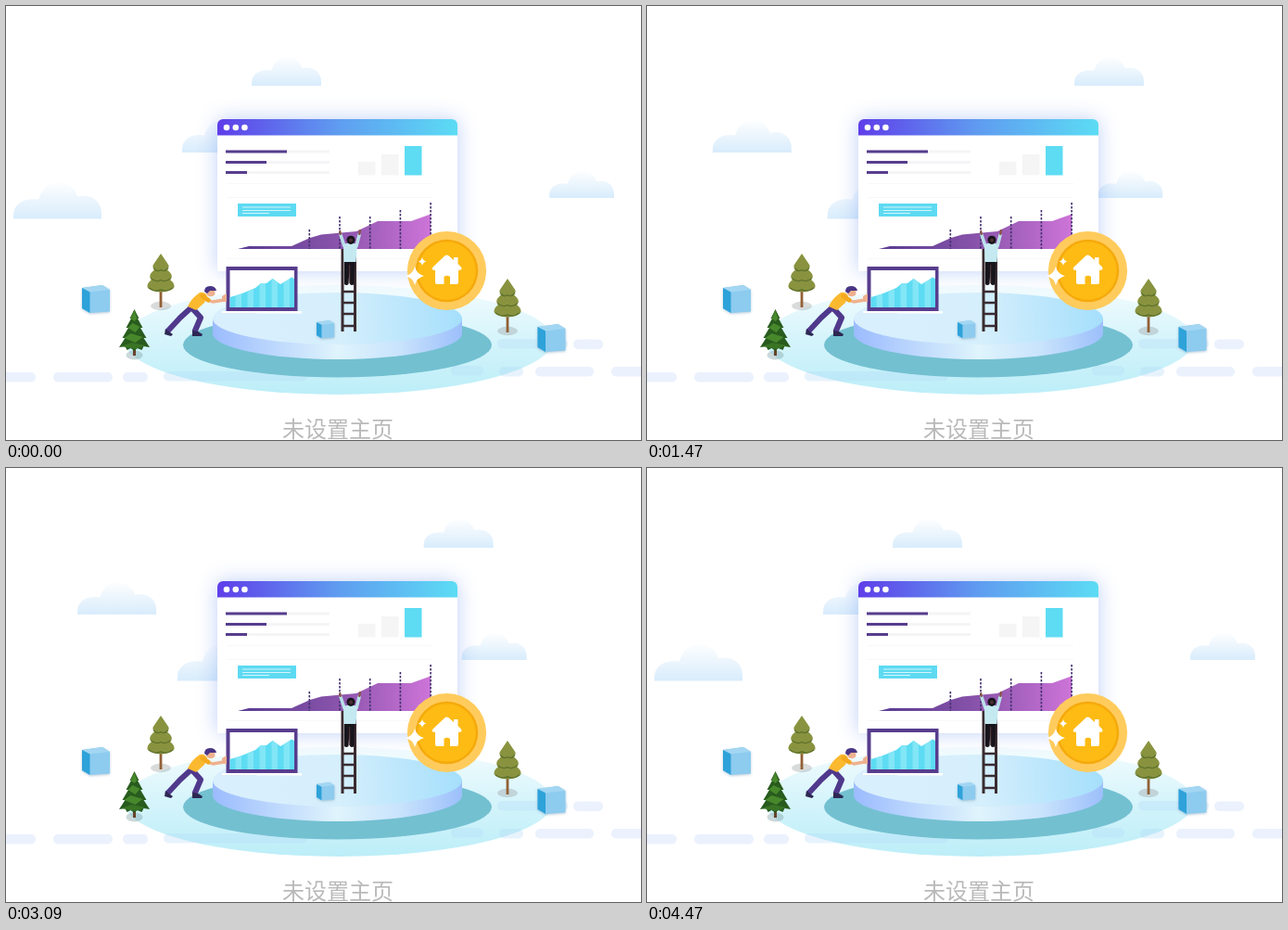
Animation of 685 by 468 pixels, one loop 4.5 s. Source, as an HTML page with a canvas:

```html
<!DOCTYPE html>
<html lang="zh">
<head>
<meta charset="utf-8">
<style>
html, body { margin: 0; width: 100%; height: 100%; overflow: hidden; background: #fff; }
canvas { display: block; width: 685px; height: 468px; }
</style>
</head>
<body>
<canvas id="stage" width="685" height="468"></canvas>
<script>
const W = 685, H = 468;
const LOOP = 4500, STEP = 30, TURN = 2245, LAST = 4470;
const stage = document.getElementById('stage').getContext('2d');
const sceneCanvas = document.createElement('canvas');
sceneCanvas.width = W;
sceneCanvas.height = H;
const g = sceneCanvas.getContext('2d');

const fill = (color, d) => { g.fillStyle = color; g.fill(new Path2D(d)); };
const rect = (color, x, y, w, h) => { g.fillStyle = color; g.fillRect(x, y, w, h); };
function line(color, width, d, cap = 'butt') {
  g.strokeStyle = color;
  g.lineWidth = width;
  g.lineCap = cap;
  g.lineJoin = 'round';
  g.stroke(new Path2D(d));
}
function oval(color, x, y, rx, ry = rx) {
  g.fillStyle = color;
  g.beginPath();
  g.ellipse(x, y, rx, ry, 0, 0, Math.PI * 2);
  g.fill();
}
function rounded(color, x, y, w, h, r) {
  g.fillStyle = color;
  g.beginPath();
  g.roundRect(x, y, w, h, r);
  g.fill();
}
function gradient(ctx, x0, y0, x1, y1, ...colors) {
  const result = ctx.createLinearGradient(x0, y0, x1, y1);
  colors.forEach((c, i) => result.addColorStop(i / (colors.length - 1), c));
  return result;
}
function at(x, y, scale, draw) {
  g.save();
  g.translate(x, y);
  g.scale(scale, scale);
  draw();
  g.restore();
}

function drawGround() {
  oval(gradient(g, 0, 301, 0, 419, '#f4fcfe', '#d5f4fb', '#bceef8'), 358.5, 360, 231.5, 59);
  const pill = (x, y, w, color = '#ebf1fd') => rounded(color, x, y, w, 10.5, 5);
  pill(-8, 395, 40);
  pill(51, 395, 64);
  pill(126, 395, 27);
  pill(571, 389, 63);
  pill(653, 389, 40);
  pill(612, 359.5, 32);
  const tint = 'rgba(175,215,245,.3)';
  pill(170, 394, 155, tint);
  pill(480, 388, 35, tint);
  pill(532, 389, 26, tint);
  pill(530, 359, 76, tint);
  oval('#73c0d1', 357.5, 365.5, 166.5, 35);
  fill(gradient(g, 223, 0, 492, 0, '#9bbbfe', '#bdd8fd', '#dff4fc', '#c9e3fc', '#9cbffb'),
    'M223 337V353A134.5 28 0 0 0 492 353V337Z');
  oval(gradient(g, 223, 345, 492, 325, '#d9effd', '#d6effc', '#a5dffc'), 357.5, 337, 134.5, 28);
}

function drawWindow() {
  g.save();
  g.shadowColor = 'rgba(85,130,235,.38)';
  g.shadowBlur = 22;
  rounded('#fff', 228, 122, 259, 164, [6, 6, 0, 0]);
  g.restore();
  rounded(gradient(g, 228, 0, 487, 0, '#5f3ee9', '#5f9cf0', '#5cdcf4'), 228, 122, 259, 17.5, [6, 6, 0, 0]);
  [238, 247.8, 257.4].forEach(x => oval('#fff', x, 131, 3.3));

  [[155.5, 66], [167, 44], [178, 23]].forEach(([y, w]) => {
    rect('#f5f5f7', 237, y, 112, 3);
    rect('#573d8d', 237, y, w, 3);
  });
  rect('#f5f5f6', 380, 168, 18.5, 14.5);
  rect('#f5f5f6', 405, 160, 18.5, 22.5);
  rect('#5ddcf3', 430, 151, 18.5, 31.5);
  [191, 206, 272].forEach(y => rect('#f8f8f9', 238, y, 222, 1));

  rect('#5ddaf2', 250, 213, 63, 14);
  [[216.5, 52], [220, 52], [223, 29]].forEach(([y, w]) => rect('#d5f5fb', 255, y, w, 1));

  fill(gradient(g, 250, 0, 458, 0, '#583b91', '#8853aa', '#cd74d8'),
    'M250 262L262 259H308L328 250L340 246.5L378 243L401 232H437L458 224.5V262Z');
  g.setLineDash([2.5, 1.5]);
  [241, 227, 227, 220, 212].forEach((y, i) => line('#43306f', 1.6, `M${327.3 + i * 32.7} ${y}V262`));
  g.setLineDash([]);
}

function drawLadder() {
  const wood = '#3a2c31';
  line(wood, 3, 'M363 262V351M376.5 262V351');
  line(wood, 2.6, 'M363 308H376M363 320H376M363 332H376M363 345H376');
  fill('#17151b', 'M365 274H376.5L375.5 300Q373 302 371 300L370.5 284L369.5 300Q367 302 365 300Z');
  line('#55383a', 1, 'M370.7 279V299');
  line('#b9dfe8', 3.6, 'M365 259L361 247M378 259L381 247', 'round');
  line('#8a5545', 2.2, 'M360.8 246L360.3 243M381.2 246L382 242', 'round');
  fill('#c4e9f1', 'M364 257Q371 254 379 257L377.5 276H364.5Z');
  oval('#18151a', 372, 252.3, 4.6);
  oval('#4c3032', 372, 252.5, 2);
}

function drawCoin() {
  oval('#ffcb5c', 475.5, 285.5, 42.6);
  oval('#f5a90b', 475.5, 285.5, 33.7);
  oval('#fdbb14', 475.5, 285.5, 31.3);
  fill('#fff', 'M473.5 269.2Q475.5 267.6 477.5 269.2L483 274V271H487.5V278L491 281.5Q492.5 284.5 489.5 284.8H488V298Q488 300 486 300H479V292Q475.5 289.5 472.5 292V300H465Q463 300 463 298V284.8H461.5Q458.5 284.5 460.5 281.5Z');
  const sparkle = 'M0 -10Q2 -2 10 0Q2 2 0 10Q-2 2 -10 0Q-2 -2 0 -10Z';
  at(441, 291, 1, () => fill('#fff', sparkle));
  at(449, 275.5, .45, () => fill('#fff', sparkle));
}

function drawTree() {
  oval('rgba(150,155,155,.36)', 0, 56.5, 11, 4.7);
  rect('#926036', -1.4, 38, 2.8, 20);
  const tiers = [
    'M0 18L13 31Q17 36 11 39Q0 44 -11 39Q-17 36 -13 31Z',
    'M0 10L10.5 21Q14 26 9 28Q0 32 -9 28Q-14 26 -10.5 21Z',
    'M0 0L7.5 11Q10.5 15 6 16.5Q0 19 -6 16.5Q-10.5 15 -7.5 11Z'
  ];
  tiers.forEach((d, i) => {
    fill('#89933f', d);
    const y = [37, 26.5, 15.5][i], w = [13, 11, 8][i];
    line('#5f722d', 1.4, `M${-w} ${y}Q${-w / 2} ${y + 5} 0 ${y + 2}Q${w / 2} ${y + 5} ${w} ${y}`);
  });
}

function drawPine() {
  oval('rgba(130,165,170,.42)', 0, 49.5, 9, 5);
  rect('#684228', -1.5, 42, 3, 8);
  fill('#285b1e', 'M0 0L5 10L3.5 10L9 20L6.5 20L13 31L10 31L16.5 41L10 40L8 44L3 42L0 45L-4 42L-8 44L-10 40L-16.5 41L-10 31L-13 31L-6.5 20L-9 20L-3.5 10L-5 10Z');
  fill('#48882c', 'M0 1L3 10L0 13L-4 10ZM-2 15L6 19L1 25L-7 20ZM-4 26L9 30L1 36L-11 31Z');
  fill('#397425', 'M-3 36L12 39L1 43L-14 40Z');
}

function drawCube() {
  g.save();
  g.shadowColor = 'rgba(70,120,160,.4)';
  g.shadowBlur = 3;
  g.shadowOffsetY = 1;
  fill('#8dcbef', 'M0 3L22 0L30 5V28.5L8.5 30L0 25Z');
  g.restore();
  fill('#a2d6f2', 'M0 3L22 0L30 5L8.5 7.5Z');
  fill('#2ea2d9', 'M0 3L8.5 7.5V30L0 25Z');
}

function drawPanel() {
  rect('#fff', 233, 329, 86, 2.5);
  rect('#dcecf5', 233, 331, 37, 1);
  rect('#573d8d', 237.5, 281, 77, 48);
  rect('#fff', 241.5, 285, 69.5, 40);
  g.save();
  g.clip(new Path2D('M241.5 314L252 311L262 307L269 304L275 299H281L287.5 294L296 300L303 296L308 292.5L311 294V325H241.5Z'));
  rect('#5ddcf3', 241, 285, 70, 40);
  for (let x = 247.5; x < 311; x += 13) rect('#82e6f6', x, 285, 6.5, 40);
  g.restore();
}

function drawPusher() {
  line('#50398c', 6, 'M199 326L188 336L175 350', 'round');
  line('#50398c', 6.2, 'M201 326L210 336L204 350', 'round');
  line('#eeb18f', 3.4, 'M208 314L223 319L235 317', 'round');
  fill('#eeb18f', 'M233 313L238 310V319L233 319Z');
  fill('#fbb92f', 'M196 324Q200 315 209 309Q215 308 217 313L214 320L205 328Z');
  line('#f4a91f', 5, 'M212 313L218 317', 'round');
  fill('#eeb18f', 'M215 306L225 306L225.5 311Q222 315 217 312Z');
  fill('#493586', 'M214 308Q214 302 220 302Q226 302 227 307L220 307L217 310Z');
  fill('#2d2853', 'M172 348L177 352L180 354L178 356L171 354Z');
  fill('#2d2853', 'M201 350L207 351L212 354L211 356H201Z');
}

function drawScene() {
  drawGround();
  drawWindow();
  at(167, 267, 1, drawTree);
  at(541, 294, 1, drawTree);
  at(138.5, 327, 1, drawPine);
  at(82, 301, 1, drawCube);
  at(573.5, 343, 1, drawCube);
  at(335, 339, .64, drawCube);
  drawLadder();
  drawPanel();
  drawPusher();
  drawCoin();
  g.fillStyle = '#b9b9b9';
  g.font = '300 24px "Noto Sans CJK SC", "Noto Sans CJK", sans-serif';
  g.textAlign = 'center';
  g.textBaseline = 'alphabetic';
  g.fillText('未设置主页', 358, 465);
}

const cloudShape = new Path2D('M0 1V.9C0 .62 .1 .46 .22 .46Q.26 .46 .285 .47C.32 .16 .41 0 .51 0C.61 0 .69 .14 .73 .39C.88 .3 1 .52 1 .84V1Z');
const clouds = [
  { x: 265, y: 55, w: 75, h: 31, travel: 299.3 },
  { x: 190, y: 123, w: 85, h: 35, travel: -182 },
  { x: 8, y: 190, w: 95, h: 39.5, travel: 285 },
  { x: 586, y: 178, w: 70, h: 29, travel: -152.2 }
];
const cloudFill = gradient(stage, 0, 0, 0, 1, '#fdfeff', '#ebf5fd', '#d8ecfc');

function drawCloud({ x, y, w, h, travel }, progress) {
  stage.save();
  stage.translate(x + travel * progress, y);
  stage.scale(w, h);
  stage.fillStyle = cloudFill;
  stage.fill(cloudShape);
  stage.restore();
}

function render(now) {
  const t = Math.floor((now % LOOP) / STEP) * STEP;
  const progress = t < TURN ? t / TURN : (LAST - t) / (LAST - TURN);
  stage.fillStyle = '#fff';
  stage.fillRect(0, 0, W, H);
  clouds.forEach(cloud => drawCloud(cloud, progress));
  stage.drawImage(sceneCanvas, 0, 0);
}

drawScene();
const start = performance.now();
function tick() {
  render(performance.now() - start);
  requestAnimationFrame(tick);
}
tick();
</script>
</body>
</html>
```
